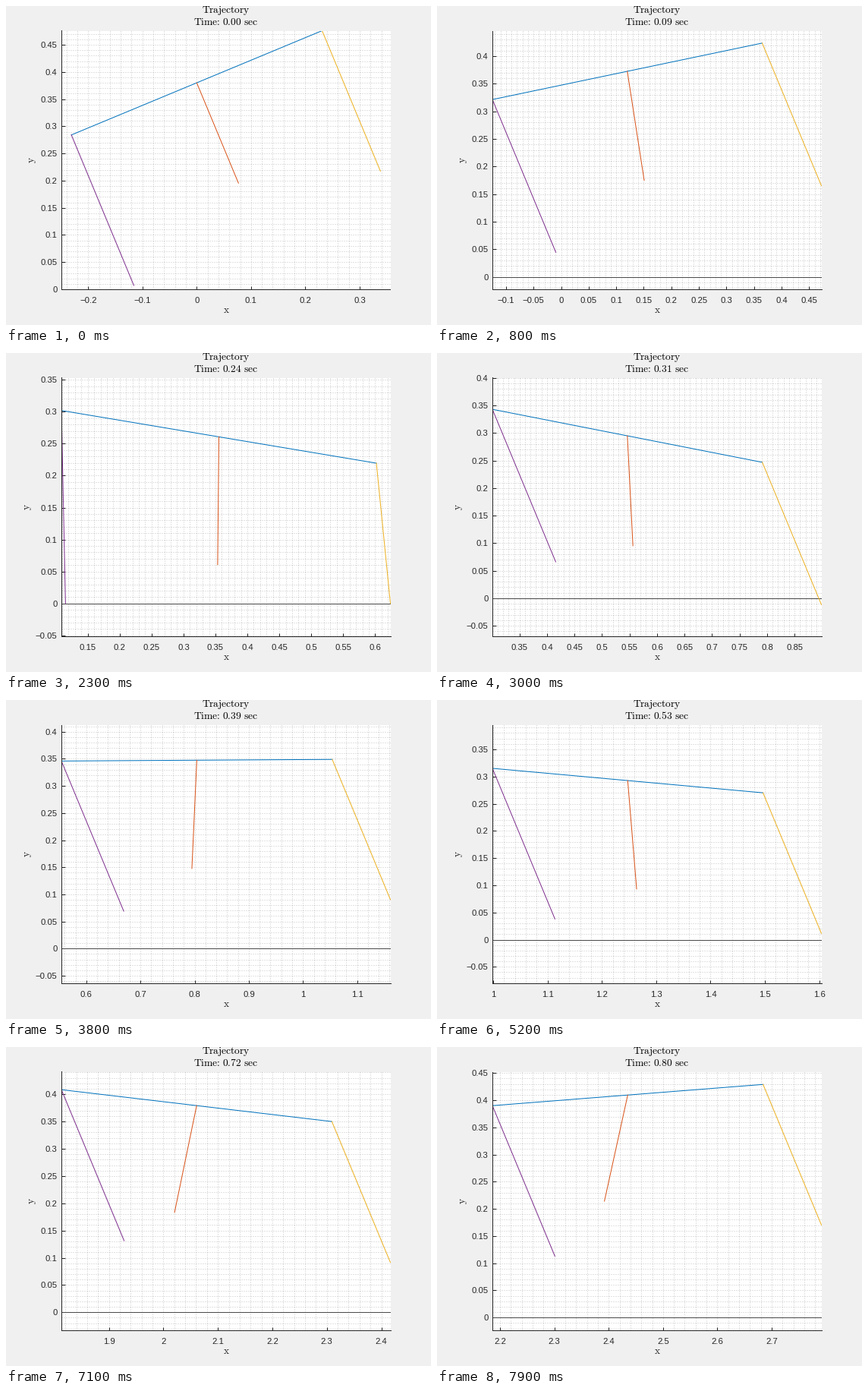
A matplotlib script that plays this animation: 560x420 px, repeating every 8000 ms.

```python
import numpy as np
import matplotlib.pyplot as plt
from matplotlib.animation import FuncAnimation
from matplotlib.ticker import FuncFormatter, MultipleLocator

PX = 0.72  # points per pixel at 100 dpi
plt.rcParams.update({"font.family": "Liberation Sans", "mathtext.fontset": "cm"})

BLUE, ORANGE, YELLOW, PURPLE = "#0072BD", "#D95319", "#EDB120", "#7E2F8E"
INK = "#262626"
LEFT, RIGHT, TOP, BOTTOM = 73, 506.5, 32.5, 373

HALF, TAIL, REAR, FRONT = 0.25, 0.2, 0.3, 0.28
LEG = np.radians(22.56)  # leg angle while swinging
ACCEL = np.array([0, -9.81, 0, 0])

# Key poses: x, y, body pitch and tail angle in degrees.
TIMES = np.array([0, 0.16, 0.31, 0.39, 0.53, 0.64, 0.80])
POSES = np.array([
    (0, 0.38, 22.56, 22.6),
    (0.2135, 0.312, 3.44, -1.9),
    (0.546, 0.295, -11.1, 2.9),
    (0.804, 0.3475, 0.34, -2.6),
    (1.2475, 0.2925, -5.16, 4.7),
    (1.687, 0.286, -17.9, -11),
    (2.435, 0.4095, 4.48, -12.4),
])
FLIGHTS = (0, 2, 3, 5)  # segments without ground contact

# Start and end of each ground contact.
REAR_STEPS = [(0.185, 0.285), (0.565, 0.615)]
FRONT_STEPS = [(0.195, 0.295), (0.545, 0.607), (0.607, 0.655)]


def flight_rates():
    """Free flight sets the rates; the contacts join them smoothly."""
    found = [[] for _ in TIMES]
    for k in FLIGHTS:
        h = TIMES[k + 1] - TIMES[k]
        mean = (POSES[k + 1] - POSES[k]) / h
        found[k].append(mean - ACCEL * h / 2)
        found[k + 1].append(mean + ACCEL * h / 2)
    return np.array([np.mean(r, axis=0) for r in found])


RATES = flight_rates()


def state(t):
    k = int(np.clip(np.searchsorted(TIMES, t, side="right") - 1, 0, len(TIMES) - 2))
    h = TIMES[k + 1] - TIMES[k]
    u = (t - TIMES[k]) / h
    return ((1 + 2 * u) * (1 - u) ** 2 * POSES[k] + u * (1 - u) ** 2 * h * RATES[k]
            + u * u * (3 - 2 * u) * POSES[k + 1] + u * u * (u - 1) * h * RATES[k + 1])


def hang(point, length, angle):
    return point + length * np.array([np.sin(angle), -np.cos(angle)])


def hip(t, side):
    x, y, pitch, _ = state(t)
    a = np.radians(pitch)
    return np.array([x, y]) + side * HALF * np.array([np.cos(a), np.sin(a)])


def leg(t, side, length, steps):
    """Hip and foot; the foot stays where it landed during a contact."""
    top = hip(t, side)
    for start, end in steps:
        if start <= t < end:
            return top, np.array([hang(hip(start, side), length, LEG)[0], 0])
    return top, hang(top, length, LEG)


def pose(t):
    mid, swing = state(t)[:2], np.radians(state(t)[3])
    return [(hip(t, -1), hip(t, 1)),
            (mid, hang(mid, TAIL, swing)),
            leg(t, 1, FRONT, FRONT_STEPS),
            leg(t, -1, REAR, REAR_STEPS)]


def tick_text(v, _):
    return f"{round(v, 4) + 0:g}".replace("-", "\u2212")


fig = plt.figure(figsize=(5.6, 4.2), dpi=100, facecolor="#F0F0F0")
ax = fig.add_axes([LEFT / 560, 1 - BOTTOM / 420, (RIGHT - LEFT) / 560, (BOTTOM - TOP) / 420])
ax.set_axisbelow(True)
ax.spines[["top", "right"]].set_visible(False)
for side in ("left", "bottom"):
    ax.spines[side].set(color=INK, linewidth=PX)
ax.tick_params(which="major", direction="in", length=4.5 * PX, width=PX,
               color=INK, labelcolor=INK, labelsize=11.3 * PX)
ax.tick_params(axis="x", pad=10 * PX)
ax.tick_params(axis="y", pad=5.5 * PX)
ax.tick_params(which="minor", length=0)
for axis in (ax.xaxis, ax.yaxis):
    axis.set_major_formatter(FuncFormatter(tick_text))
    axis.remove_overlapping_locs = False
ax.grid(which="minor", color="#1A1A1A", alpha=0.25, linewidth=PX, linestyle=(0, (1, 2)))

ax.axhline(0, color="#4A4A4A", lw=PX)
lines = [ax.plot([], [], color=c, lw=PX)[0] for c in (BLUE, ORANGE, YELLOW, PURPLE)]


def label(x, y, s, color=INK, **kw):
    return fig.text(x / 560, 1 - y / 420, s, color=color, ha="center",
                    fontsize=13.45 * PX, **kw)


label(289.7, 9, r"$\text{Trajectory}$", "black", va="baseline")
clock = label(289.7, 25, "", "black", va="baseline")
label(290.5, 404.5, r"$\text{x}$", va="baseline")
ylab = label(36, 203, r"$\text{y}$", va="center", rotation=90)


def set_ticks(axis, step):
    axis.set_major_locator(MultipleLocator(step))
    axis.set_minor_locator(MultipleLocator(step / 5))


def draw(i):
    t = 0.01 * (i + 1) if i else 0.0
    parts = pose(t)
    for line, (p, q) in zip(lines, parts):
        line.set_data([p[0], q[0]], [p[1], q[1]])

    # Tight limits with equal scales; the ground counts as data.
    pts = np.array(parts).reshape(-1, 2)
    lo, hi = pts.min(axis=0), pts.max(axis=0)
    lo[1] = min(lo[1], 0)
    size = np.array([RIGHT - LEFT, BOTTOM - TOP])
    span = size * np.max((hi - lo) / size)
    lo, hi = (lo + hi - span) / 2, (lo + hi + span) / 2
    ax.set_xlim(lo[0], hi[0])
    ax.set_ylim(lo[1], hi[1])

    ystep = 0.05 if span[1] < 0.52 else 0.1
    set_ticks(ax.xaxis, 0.05 if span[0] < 0.6 else 0.1)
    set_ticks(ax.yaxis, ystep)
    ylab.set_x((29.5 if lo[1] <= -ystep else 35.5) / 560)
    clock.set_text(rf"$\text{{Time:}}\ \text{{{t:.2f}}}\ \text{{sec}}$")
    return lines


anim = FuncAnimation(fig, draw, frames=80, interval=100, repeat=True, repeat_delay=0,
                     init_func=lambda: lines, blit=False)
plt.show()
```
